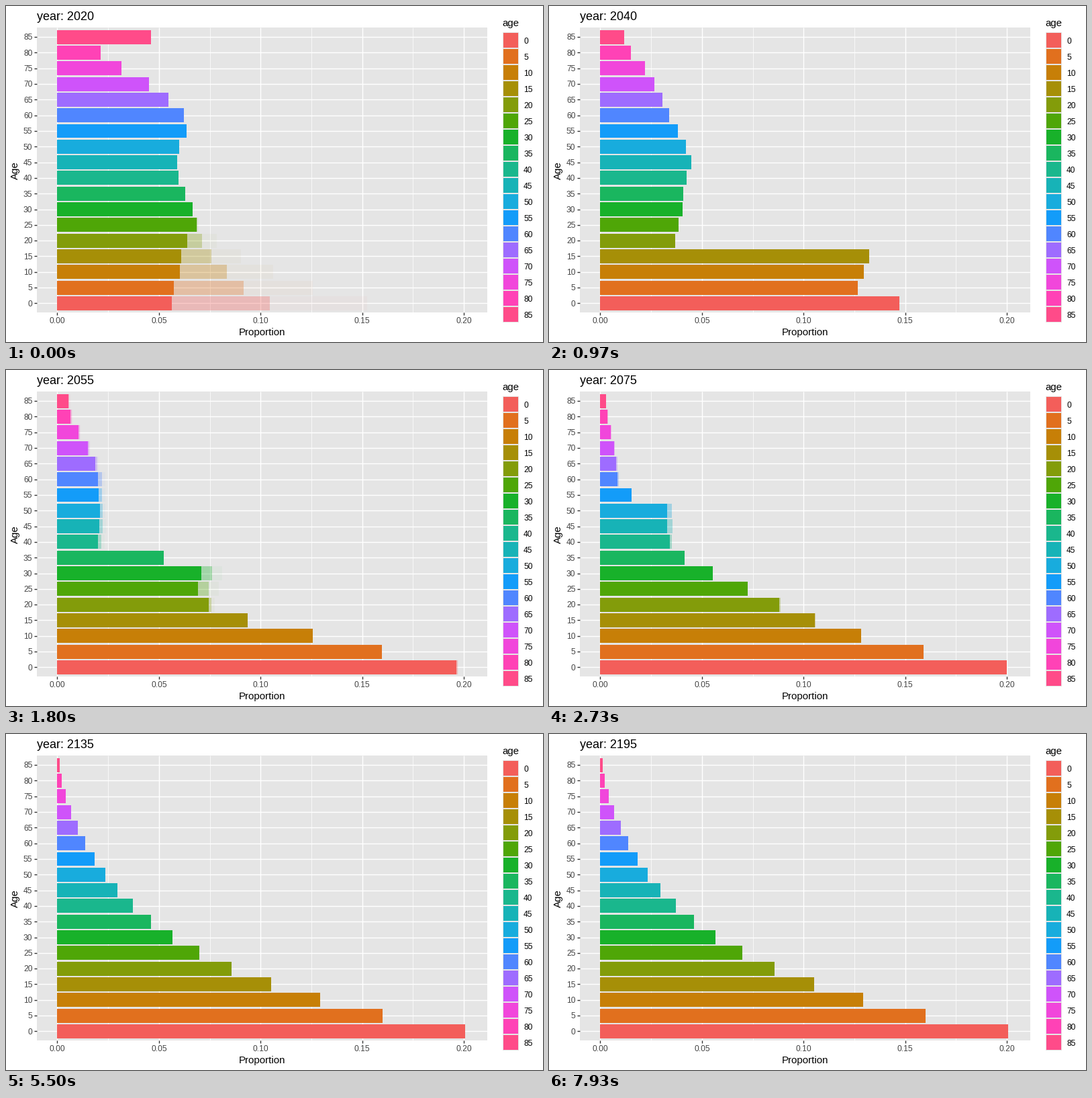
A matplotlib script for the animation above (8000 ms loop, 800x500 px).

```python
import numpy as np
import matplotlib.pyplot as plt
from matplotlib.animation import FuncAnimation
from matplotlib.patches import Rectangle

plt.rcParams["font.family"] = "Liberation Sans"

W, H, DPI = 800, 500, 100
FRAMES, LOOP_MS = 240, 8000
LEFT, RIGHT, TOP, BOTTOM = 46, 717, 32.2, 456.3
X0, X_SCALE = 76.4, 3029
STEP = (BOTTOM - TOP) / 18.2
GREY = "#E5E5E5"
AGES = range(0, 90, 5)
COLORS = ("#F35E5A #E1701E #C77F07 #A68F07 #839C0A #4FA607 #18B12A #1AB65F #1AB78D "
          "#17B3B7 #18ACDD #139CF9 #5086FF #9E6CFF #CF53FA #F146DB #FF42B6 #FF4B89").split()

# Cohort projection in five-year steps
START = np.array([171, 174, 183, 185, 194, 208.5, 202, 191, 181,
                  179, 182, 193, 189, 166, 137, 96, 65, 140])
SURVIVAL = np.array([.975, .988, .996, .997, .994, .994, .993, .988, .973,
                     .968, .952, .925, .89, .83, .735, .645, .5, .35])
BIRTHS = np.zeros(18)
BIRTHS[2:9] = .233, .542, .767, .626, .498, .338, .128


def project(n):
    alive = n * SURVIVAL
    new = np.append(BIRTHS @ n, alive[:-1])
    new[-1] += alive[-1]
    return new


def projected_shares(steps):
    n, rows = START, []
    for _ in range(steps + 1):
        rows.append(n / n.sum())
        n = project(n)
    return rows


STATES = projected_shares(36)

# Each state rests, then moves linearly over three frames
MOVE = 3
LONG, SHORT, SWITCH = 7, 6, 168


def phase(i):
    """State index, progress to the next state, and state to name."""
    if i < SWITCH:
        k, r = divmod(i, LONG)
        rest, flip = LONG - MOVE, 6
    else:
        k, r = divmod(i - SWITCH, SHORT)
        k += SWITCH // LONG
        rest, flip = SHORT - MOVE, 4
    return k, max(0, r - rest + 1) / MOVE, k + (r >= flip)


def shares(i):
    if i < 0:  # wake of the move from the last state back to the first
        a, b, p = STATES[-1], STATES[0], (i + MOVE) / MOVE
    else:
        k, p, _ = phase(i)
        a, b = STATES[k], STATES[min(k + 1, len(STATES) - 1)]
    return a + (b - a) * p


fig = plt.figure(figsize=(W / DPI, H / DPI), dpi=DPI, facecolor="white")
ax = fig.add_axes([0, 0, 1, 1])
ax.set(xlim=(0, W), ylim=(H, 0))
ax.axis("off")


def rect(x, y, w, h, color, **kw):
    return ax.add_patch(Rectangle((x, y), w, h, fc=color, lw=0, **kw))


def line(x, y, color, px, z):
    ax.plot(x, y, color=color, lw=px * 72 / DPI, solid_capstyle="butt", zorder=z)


def label(x, y, s, px, color="black", **kw):
    return ax.text(x, y, s, fontsize=px * 72 / DPI, color=color, va="baseline", **kw)


def row(k):
    return BOTTOM - (k + .6) * STEP


rect(LEFT, TOP, RIGHT - LEFT, BOTTOM - TOP, GREY, zorder=0)

for k in range(9):
    x = X0 + k * .025 * X_SCALE
    major = k % 2 == 0
    line([x, x], [TOP, BOTTOM], "white", 1.4 if major else .7, 1)
    if major:
        line([x, x], [BOTTOM, BOTTOM + 3.7], "#333333", 1.4, 1)
        label(x, 472, f"{k * .025:.2f}", 12, "#444444", ha="center")

for k, age in enumerate(AGES):
    y = row(k)
    line([LEFT, RIGHT], [y, y], "white", 1.4, 1)
    line([LEFT - 3.7, LEFT], [y, y], "#333333", 1.4, 1)
    label(39.5, y + 4.3, str(age), 12, "#444444", ha="right")

# Wake layers first, solid bars on top
layers = []
for z, (lag, alpha) in enumerate([(2, 1 / 27), (1, 8 / 27), (0, 1)], 2):
    bars = [rect(X0, row(k) - .45 * STEP, 0, .9 * STEP, c, alpha=alpha, zorder=z)
            for k, c in enumerate(COLORS)]
    layers.append((lag, bars))

title = label(46, 21, "", 18)
label((LEFT + RIGHT) / 2, 490, "Proportion", 15, ha="center")
label(18, 244.5, "Age", 15, ha="center", rotation=90, rotation_mode="anchor")

label(739.5, 30, "age", 15)
rect(740, 39, 24, 24 * 18, GREY, zorder=1)
for k, (age, c) in enumerate(zip(AGES, COLORS)):
    rect(741, 40 + 24 * k, 22, 22, c, zorder=2)
    label(771, 55.7 + 24 * k, str(age), 12)


def update(i):
    for lag, bars in layers:
        for bar, share in zip(bars, shares(i - lag)):
            bar.set_width(share * X_SCALE)
    title.set_text(f"year: {2020 + 5 * phase(i)[2]}")
    return [title]


anim = FuncAnimation(fig, update, frames=FRAMES, interval=LOOP_MS / FRAMES,
                     repeat=True, repeat_delay=0, blit=False)
plt.show()
```
